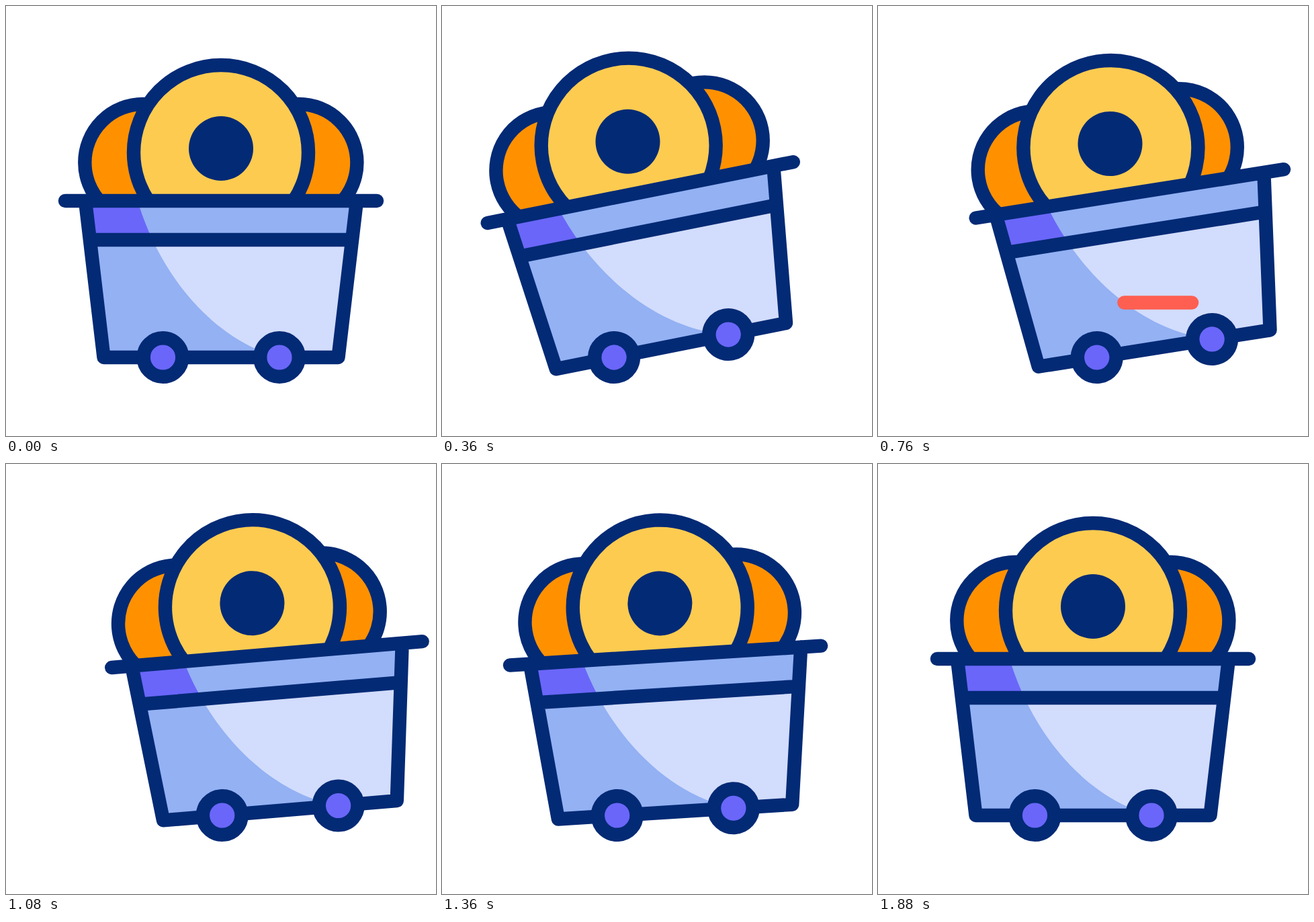
Recreate the animation shown at these times as an HTML page. Size 640 px wide and 640 px high, loop 2.4 s.

```html
<!DOCTYPE html>
<html lang="en">
<head>
<meta charset="utf-8">
<title>Mine cart</title>
<style>
  html, body { margin: 0; width: 100%; height: 100%; overflow: hidden; background: #fff; }
  svg { display: block; width: 100vw; height: 100vh; }
  .ink { stroke: #032a75; stroke-width: 20.4; stroke-linecap: round; stroke-linejoin: round; fill: none; }
  .side { fill: #ff9100; }
  .main { fill: #fdcb50; }
  .mark { fill: #032a75; }
  .light { fill: #d2dcfd; }
  .mid { fill: #93b1f3; }
  .violet { fill: #6a66f9; }
  .dash { stroke: #ff5f51; stroke-width: 20.6; stroke-linecap: round; }
</style>
</head>
<body>
<svg viewBox="0 0 640 640">
  <defs>
    <clipPath id="tub"><path d="M118 290L145.5 523H494.5L522 290Z"/></clipPath>
    <clipPath id="band"><path d="M100 290H540V348H100Z"/></clipPath>
    <path id="shade" d="M100 290H195L199 300C230 395 295 478 378 513L395 523H100Z"/>
  </defs>
  <g id="cart">
    <circle id="left" class="ink side" cx="204.3" cy="233" r="87"/>
    <circle id="right" class="ink side" cx="435.4" cy="233" r="87"/>
    <g id="middle">
      <circle class="ink main" cx="320" cy="218" r="130"/>
      <circle class="mark" cx="320" cy="212" r="48"/>
    </g>
    <g clip-path="url(#tub)">
      <path class="light" d="M100 290H540V523H100Z"/>
      <use href="#shade" class="mid"/>
      <g clip-path="url(#band)">
        <path class="mid" d="M100 290H540V348H100Z"/>
        <use href="#shade" class="violet"/>
      </g>
    </g>
    <path class="ink" d="M118 290L145.5 523H494.5L522 290M125 348H515M88 290H552"/>
    <circle class="ink violet" cx="233.5" cy="523" r="28.8"/>
    <circle class="ink violet" cx="407" cy="523" r="28.8"/>
  </g>
  <path class="dash" id="upper"/>
  <path class="dash" id="lower"/>
</svg>
<script>
  const LOOP = 2400, STEP = 40;
  const get = id => document.getElementById(id);
  const cart = get("cart");

  const clamp = u => Math.min(1, Math.max(0, u));
  const part = (t, from, to) => clamp((t - from) / (to - from));
  const cubic = u => u < 0.5 ? 4 * u ** 3 : 1 - 4 * (1 - u) ** 3;
  const soft = u => u * u * (3 - 2 * u);

  const travel = t => 94.2 * (cubic(part(t, 0, 920)) - cubic(part(t, 868, 1711)));
  const lag = t => cubic(part(t, 27, 933)) - cubic(part(t, 796, 1679));
  const tilt = t => -11.3 * soft(part(t, 0, 365))
    + 7.6 * soft(part(t, 460, 1275))
    + 3.7 * soft(part(t, 1290, 1880));

  // How far each coin slides back inside the cart.
  const coins = [
    { el: get("left"), slide: 16.6 },
    { el: get("middle"), slide: 17.9 },
    { el: get("right"), slide: 33.5 }
  ];

  // A streak enters at x = from, sweeps right and is trimmed at x = to.
  const streaks = [
    { el: get("upper"), y: 327.5, from: 56, to: 581, at: 520, head: 394.5 },
    { el: get("lower"), y: 441.5, from: 125, to: 627, at: 760, head: 467 }
  ];

  function drawStreak({ el, y, from, to, at, head }, t) {
    const x = head + 4 * (t - at);
    const a = Math.max(from, x - 100.5), b = Math.min(to, x);
    el.setAttribute("d", b > a ? `M${a} ${y}H${b}` : "");
  }

  function draw(t) {
    cart.setAttribute("transform", `translate(${travel(t)} 0) rotate(${tilt(t)} 233.5 523)`);
    coins.forEach(c => c.el.setAttribute("transform", `translate(${-c.slide * lag(t)} 0)`));
    streaks.forEach(s => drawStreak(s, t));
  }

  const start = performance.now();
  function tick() {
    const t = (performance.now() - start) % LOOP;
    draw(Math.floor(t / STEP) * STEP);
    requestAnimationFrame(tick);
  }
  tick();
</script>
</body>
</html>
```
